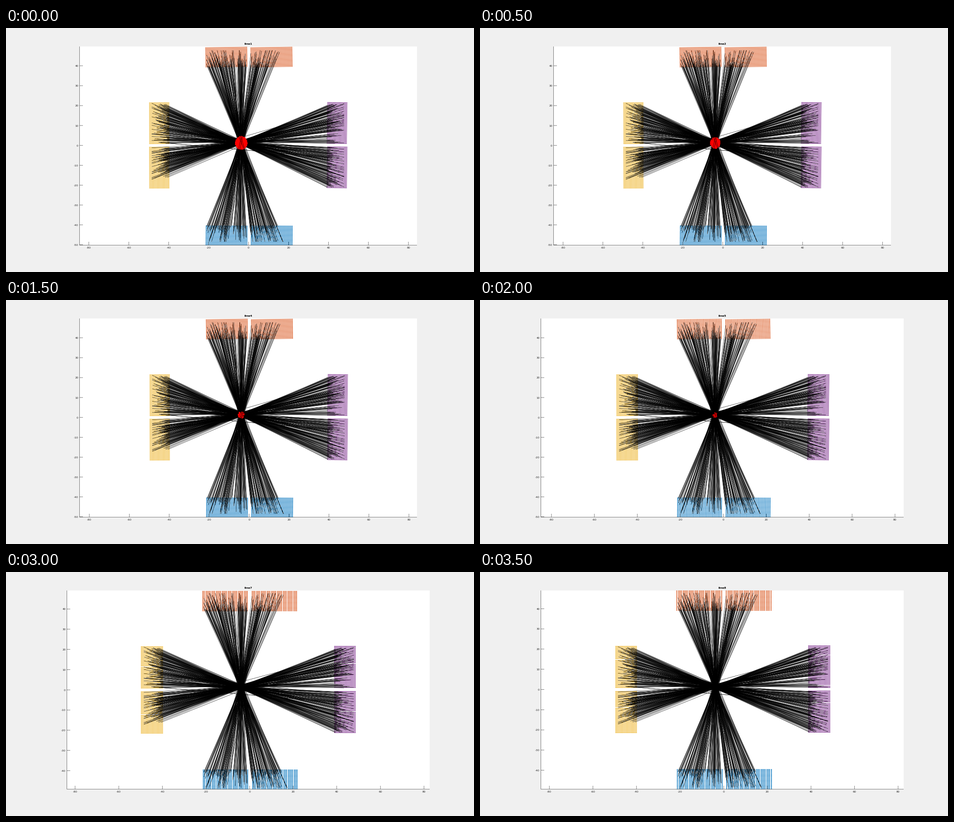
Write a matplotlib script that moves like this. It is 1034x541 px and loops after 4 s.

```python
import matplotlib.pyplot as plt
import numpy as np
from matplotlib.animation import FuncAnimation
from matplotlib.collections import LineCollection
from matplotlib.patches import Rectangle

W, H, DPI = 1034, 541, 100
PX = 72 / DPI
STEPS, RECALIBRATED = 8, 5
INK = "#262626"
TOP, BOTTOM = 41, 481.5
LONG, DEEP, STRIPES = 20.4, 10.1, 31
SOURCE = np.array([-3.95, 1.4])

# Detector sides: colour, upper left corner, tilt, stripes upright, move on recalibration
SIDES = [
    ("#D95319", (-21.4, 49.3), .8, True, (0, -.3)),
    ("#EDB120", (-49.8, 21.3), .2, False, (0, 0)),
    ("#7E2F8E", (39.4, 21.5), -.8, False, (-.7, 0)),
    ("#0072BD", (-21.2, -40.3), -.4, True, (0, .9)),
]


def get_view(i):
    """Left and right edge, then zero and scale of x and of y, in pixels."""
    left, right, x_scale = (162.5, 908, 4.413) if i < 4 else (134.5, 936, 4.744)
    x_zero = 536 + 2.5 * i / (STEPS - 1)
    if i < RECALIBRATED:
        return left, right, x_zero, x_scale, 260.2, 4.408
    return left, right, x_zero, 4.817, 262 - .75 * (i - RECALIBRATED), 4.48


def to_pixels(points, view):
    _, _, x_zero, x_scale, y_zero, y_scale = view
    return np.stack((x_zero + x_scale * points[..., 0],
                     y_zero - y_scale * points[..., 1]), axis=-1)


def block_stripes(corner, tilt, upright):
    steps = np.linspace(0, LONG, STRIPES)
    ends = [[(s, 0), (s, -DEEP)] if upright else [(0, -s), (DEEP, -s)] for s in steps]
    c, s = np.cos(np.radians(tilt)), np.sin(np.radians(tilt))
    return corner + np.array(ends) @ np.array([[c, s], [-s, c]])


def side_stripes(corner, tilt, upright, move, i):
    """Both blocks of one side; the tilt fades out after the recalibration."""
    corner = np.array(corner) + (np.array(move) if i >= RECALIBRATED else 0)
    tilt *= max(0, 1 - .5 * max(0, i - RECALIBRATED + 1))
    offset = np.array((22.6, 0) if upright else (0, -22.3))
    return np.concatenate([block_stripes(corner + k * offset, tilt, upright) for k in (0, 1)])


def make_rays(count, slopes, vertical, rng):
    """Rays through the source that hit crystals on both opposite sides."""
    along, across = SOURCE[::-1] if vertical else SOURCE
    rays = []
    while len(rays) < count:
        center = across + rng.normal(0, 2 if rng.random() < .02 else .6)
        depth = np.minimum(rng.exponential(3.6, 2), 8.5)
        ends = np.array([-40 - depth[0], 39.3 + depth[1]])
        hits = center + rng.uniform(*slopes) * (ends - along)
        if all(.9 < abs(h) < 21.2 for h in hits):
            rays.append(np.column_stack((hits, ends) if vertical else (ends, hits)))
    return rays


rng = np.random.default_rng(12)
rays = make_rays(310, (-.52, .45), False, rng) + make_rays(225, (-.44, .43), True, rng)
rays = np.array(rays + [np.array([(-45, 1.5), (45, -6.5)])])


def cluster_points(i):
    """Red marks shrink towards the source with every step."""
    local = np.random.default_rng(5)
    count = int(600 * .45 ** i) if i < RECALIBRATED else 0
    radius = (12.5 - 2 * i) * np.sqrt(local.random(count))
    angle = local.uniform(0, 2 * np.pi, count)
    return 519.3 + radius * np.cos(angle), 254.3 + 1.15 * radius * np.sin(angle)


fig = plt.figure(figsize=(W / DPI, H / DPI), dpi=DPI, facecolor="#f0f0f0")
ax = fig.add_axes([0, 0, 1, 1])


def segment(xs, ys):
    ax.plot(xs, ys, color=INK, lw=.6 * PX, solid_capstyle="butt", snap=False, zorder=6)


def label(x, y, text, **style):
    ax.text(x, y, text, fontfamily="DejaVu Sans", va="center_baseline", **style)


def draw_axes(view):
    left, right, x_zero, x_scale, y_zero, y_scale = view
    segment([left, left], [TOP, BOTTOM])
    segment([left, right], [BOTTOM - .2] * 2)
    for value in range(-80, 81, 20):
        x = x_zero + x_scale * value
        segment([x, x], [BOTTOM - 7.5, BOTTOM])
        label(x, 487.4, str(value), ha="center", size=6.1 * PX, color=INK)
    for value in range(-50, 41, 10):
        y = y_zero - y_scale * value
        if y < BOTTOM + .5:
            segment([left, left + 7.5], [y, y])
            label(left - 2.5, y + .4, str(value), ha="right", size=6.1 * PX, color=INK)


def draw(i):
    ax.clear()
    ax.set(xlim=(0, W), ylim=(H, 0))
    ax.axis("off")
    view = get_view(i)
    left, right = view[:2]
    panel = Rectangle((left, TOP), right - left, BOTTOM - TOP, fc="white", ec="none", zorder=0)
    ax.add_patch(panel)

    def strokes(lines, color, width, z, **style):
        group = LineCollection(lines, colors=color, linewidths=width * PX, zorder=z, **style)
        ax.add_collection(group)
        group.set_clip_path(panel)

    for color, *geometry in SIDES:
        stripes = to_pixels(side_stripes(*geometry, i), view)
        strokes(stripes, color, 1.9, 1, linestyles=[(0, (.9, .25))])

    lines = to_pixels(rays, view)
    strokes(lines, "black", .58, 2)
    ax.plot(*cluster_points(i), "o", ms=2.8 * PX, mfc="red", mec="none", zorder=3)
    # The last rays lie above the red cluster
    strokes(lines[-5:], "black", .58, 4)

    draw_axes(view)
    label(535.7, 35.4, f"line{i + 1}", ha="center", size=6.4 * PX, weight="bold", color="black")
    return []


anim = FuncAnimation(fig, draw, frames=STEPS, init_func=lambda: [],
                     interval=500, repeat=True, repeat_delay=0)
plt.show()
```
